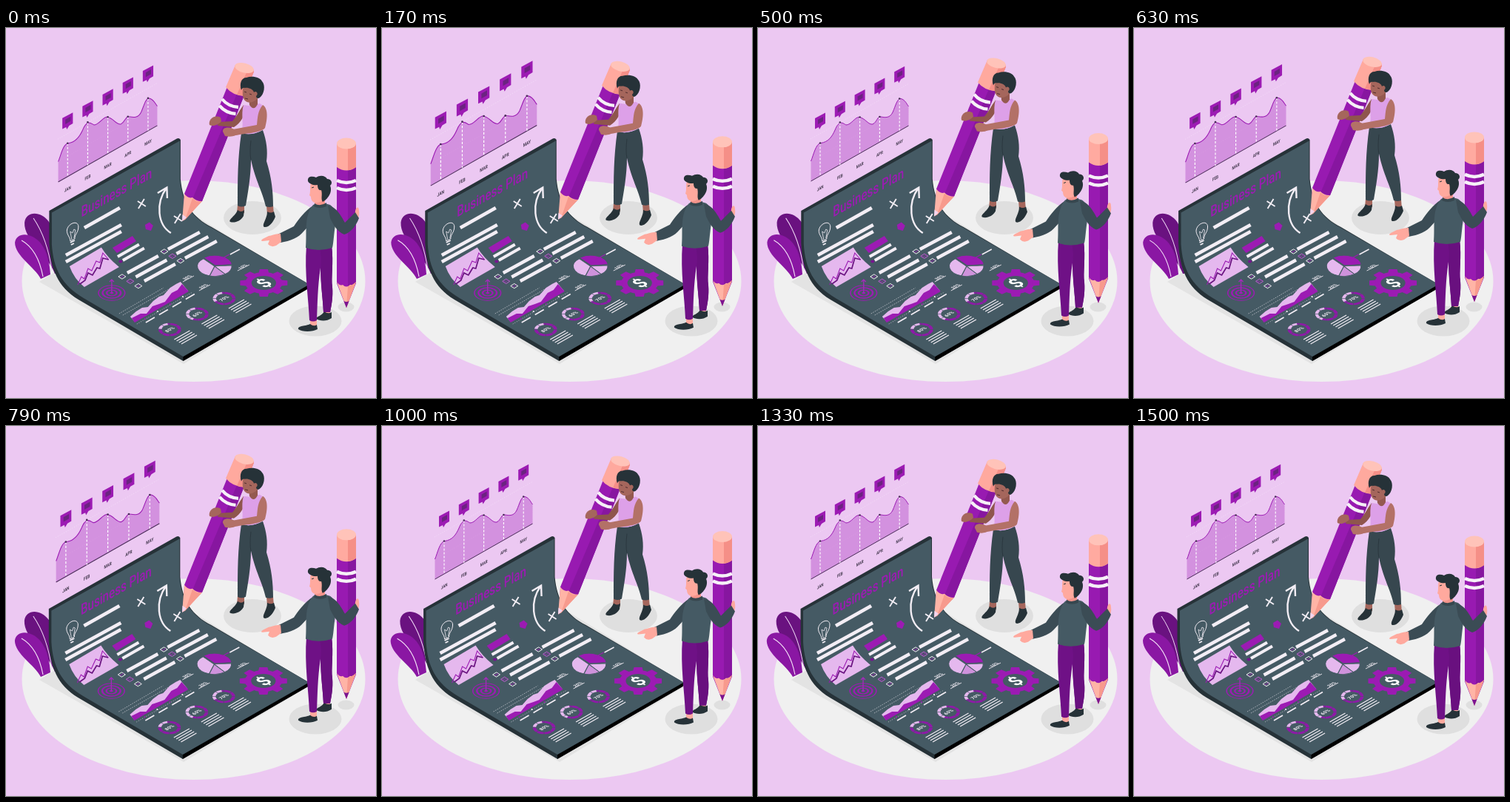
An HTML page that plays this animation: 500x500 px, repeating every 1.54 s.

```html
<!DOCTYPE html>
<html lang="en">
<head>
<meta charset="utf-8">
<title>Business Plan</title>
<style>
html, body { margin: 0; width: 100%; height: 100%; overflow: hidden; background: #ecc8f2; }
svg { display: block; width: 100vw; height: 100vh; }
text { font-family: Roboto, "Open Sans", sans-serif; text-anchor: middle; }
</style>
</head>
<body>
<svg viewBox="0 0 500 500">
  <rect width="500" height="500" fill="#ecc8f2"/>
  <ellipse cx="253.500" cy="342" rx="232" ry="136" fill="#f0f0f0"/>
  <path d="M45 343L66 330 250 250 412 350 240 454Z" fill="#e3e3e3"/>
  <g fill="#dfdfdf">
    <ellipse cx="333" cy="256.500" rx="39" ry="22.500"/>
    <ellipse cx="418" cy="396" rx="35.500" ry="20.500"/>
    <ellipse cx="459.500" cy="377" rx="11" ry="6.500"/>
  </g>

  <g id="leaves">
    <path d="M66 332C56 305 24 287 25 263C27 247 47 247 58 262C66 274 68 300 68 332Z" fill="#6a1280"/>
    <path d="M37 257C50 276 58 300 62 328" fill="none" stroke="#f0d8f5" stroke-width="1"/>
    <path d="M47 339C39 323 12 308 12 290C14 275 35 276 47 291C57 304 59 320 60 333Z" fill="#8a17a3"/>
    <path d="M21 287C37 296 46 315 50 336" fill="none" stroke="#f5e4f8" stroke-width="1.100"/>
  </g>

  <g id="paper">
    <path d="M58.500 247L231 149.500Q234 148 236 151L236 204C239 236 252 256 278 269L410 346.500V351L239.500 450 98 367C70 350 60 325 58.500 290Z" fill="#263238"/>
    <path d="M239.500 444L409 347V352L239.500 450Z" fill="#000"/>
    <path d="M62 249.500L235 152.500V204C238 236 251 256 277 269.500L410 346.500 239.500 444 105 365C75 347 64 325 62 292Z" fill="#455a64"/>
    <g id="ink"></g>
  </g>

  <g id="chart"></g>

  <g id="woman">
    <path d="M310 52L335 58 265 234 239 260 241 224Z" fill="#981ab1"/>
    <path d="M335 58L265 234 252 231 326 56Z" fill="#8716a0"/>
    <path d="M309 52C310 44 336 48 335 59L322 92Q306 91 297 80Z" fill="#ffa99e"/>
    <path d="M335 59L322 92 312 90 326 58Z" fill="#f58f87"/>
    <ellipse cx="322" cy="54" rx="13" ry="6.500" transform="rotate(14 322 54)" fill="#ffc3b9"/>
    <path d="M241 224Q246 231 252 229 258 235 265 234L242 259 238 261Z" fill="#ffb4a6"/>
    <path d="M252 230Q258 236 265 234L242 259Z" fill="#f79a8d"/>
    <path d="M238 261L238.500 252 244 256Z" fill="#f3d5ef"/>
    <path d="M292 96Q300 106 314 107M288.500 105Q297 115 310.500 116" fill="none" stroke="#f6f1f7" stroke-width="4.300"/>
    <path d="M313 239H322V250H312ZM352 240H361L362 252H353Z" fill="#a5665c"/>
    <path d="M313 246Q318 250 322 246L321 254C317 261 309 264 303 262 300 259 310 254 313 246ZM353 248Q358 251 362 248L364 255C361 263 355 270 349 269 345 266 353 258 353 248Z" fill="#263238"/>
    <path d="M318 142Q332 146 347 138C352 152 354 166 352 180 359 202 361 222 361 241Q356 243 351 241C347 222 337 206 331 178 331 200 327 222 324 240Q318 243 313 240C313 206 313 176 318 142Z" fill="#37474f"/>
    <path d="M331 152Q329 169 331 178" fill="none" stroke="#263238" stroke-width=".7"/>
    <path d="M321 104C315 112 312 119 306 126L287 127 286 132 308 134C318 128 323 117 324 108Z" fill="#8f554d"/>
    <path d="M290 121C281 116 273 124 275 131 280 134 288 130 291 126Z" fill="#a5665c"/>
    <path d="M321 104L329 105 343 102Q351 106 350 114 345 124 346 138 333 146 318 142C322 130 317 117 321 104Z" fill="#dda0e8"/>
    <path d="M328 94L340 92V103Q335 113 329 104Z" fill="#945950"/>
    <path d="M347 104C355 109 353 124 350 135 345 142 323 142 306 146L301 138 339 131C340 121 340 112 347 104Z" fill="#b37167"/>
    <path d="M310 138C302 132 292 134 293 140L296 146Q304 148 310 145Z" fill="#b37167"/>
    <path d="M321 78C319 86 319 96 324 99 330 103 338 99 342 92L341 79 330 73Z" fill="#a5665c"/>
    <path d="M318 84C315 75 318 67 325 67 333 64 344 67 346 72 351 77 349 90 343 94 341 96 338 95 338 92 342 89 338 84 335 87 334 82 326 80 323 81 320 80 319 82 318 84Z" fill="#263238"/>
    <path d="M322 86L325 87M329 89L332 90M323 95L327 96" stroke="#47252a" stroke-width=".9"/>
  </g>

  <g id="man">
    <path d="M447 157H473V345L460 378 447 345Z" fill="#981ab1"/>
    <path d="M462 160H473V345L462 349Z" fill="#8716a0"/>
    <path d="M447 156H473V188Q460 197 447 188Z" fill="#ffaaa0"/>
    <path d="M462 156H473V188Q468 192 462 192Z" fill="#f58f87"/>
    <ellipse cx="460" cy="156" rx="13" ry="7.500" fill="#ffc3b9"/>
    <path d="M447 343Q451 349 455 347 460 352 465 347 470 348 473 343L460 378Z" fill="#ffb4a6"/>
    <path d="M462 349Q468 348 473 343L460 378Z" fill="#f79a8d"/>
    <path d="M456.500 369Q460 371 463.500 369L460 378Z" fill="#7b1490"/>
    <path d="M447 206Q460 212 473 206M447 216Q460 222 473 216" fill="none" stroke="#f6f1f7" stroke-width="4.500"/>

    <path d="M430 376H438V388H430ZM411 390H420V403H411Z" fill="#ffa99e"/>
    <path d="M430 383Q435 387 440 384L440 392C433 397 424 396 419 393 419 390 427 389 430 383ZM411 400Q416 404 420 401L421 407C414 411 400 411 395 407 394 402 405 403 411 400Z" fill="#263238"/>
    <path d="M406 294H440C443 318 439 337 441 350 442 364 440 374 438 384H429C428 362 425 347 425 324 421 350 421 372 420 395Q415 398 410 395C409 367 403 331 406 294Z" fill="#6f1186"/>
    <path d="M440 294C443 318 439 337 441 350 442 364 440 374 438 384H429C428 362 424 340 426 312L424 294Z" fill="#69107f"/>
    <path d="M415 240C404 247 395 259 389 268L367 279 371 290C384 288 396 283 402 275L416 260Z" fill="#3b4c55"/>
    <path d="M371 278C362 278 359 281 355 281L347 285Q343 288 347 288L356 287 354 292Q358 297 365 294L372 289Z" fill="#ffa99e"/>
    <path d="M415 239Q426 234 438 239C445 244 447 251 446 261 443 275 443 289 441 297Q422 303 405 297C407 278 402 254 415 239Z" fill="#455a64"/>
    <path d="M472 252C471 242 477 239 477 247 478 254 476 260 470 261Z" fill="#ffa99e"/>
    <path d="M435 240C446 241 453 254 458 263L472 249 477 257C473 268 465 277 457 279 447 275 442 265 438 257Z" fill="#3b4c55"/>
    <path d="M418 228H431V239Q424 244 417 238Z" fill="#f4948b"/>
    <path d="M417 237Q424 242 433 236L433 241Q424 245 416 241Z" fill="#37474f"/>
    <path d="M412 209C410 217 412 220 410 226L412 228C412 234 416 237 421 236 428 235 433 229 434 219L427 207Z" fill="#ffa99e"/>
    <path d="M408 207C407 200 414 200 419 202 425 198 432 200 434 204 440 204 442 210 438 213 442 222 434 232 428 235 425 231 428 225 426 219 423 220 421 217 421 212 416 213 410 211 408 207Z" fill="#263238"/>
    <ellipse cx="422.500" cy="223" rx="2.600" ry="4" fill="#ffa99e"/>
    <path d="M413 216L416 215" stroke="#263238" stroke-width="1"/>
  </g>
</svg>
<script>
const $ = id => document.getElementById(id);
const WHITE = '#f3eef5', PURPLE = '#9c1bb3', PINK = '#e5b8ee', SLATE = '#455a64', PLUM = '#4a2d59';

function add(parent, tag, attrs, label) {
  const el = document.createElementNS('http://www.w3.org/2000/svg', tag);
  for (const key in attrs) el.setAttribute(key, attrs[key]);
  if (label) el.textContent = label;
  parent.appendChild(el);
  return el;
}
const shape = (g, d, fill) => add(g, 'path', { d, fill });
const stroke = (g, d, color, width, dash = 'none') =>
  add(g, 'path', { d, fill: 'none', stroke: color, 'stroke-width': width, 'stroke-dasharray': dash });
const floorAt = (g, x, y) => add(g, 'g', { transform: `matrix(.87 -.5 .87 .5 ${x} ${y})` });
const wallText = (g, x, y, size, fill, label, weight) =>
  add(g, 'text', { transform: `matrix(.75 -.42 0 1 ${x} ${y})`, 'font-size': size, 'font-weight': weight, fill }, label);
const floorText = (g, x, y, size, label) =>
  add(floorAt(g, x, y), 'text', { y: size * .36, 'font-size': size, 'font-weight': 700, fill: WHITE }, label);
const arc = (r, a, b) => {
  const at = q => `${r * Math.cos(q)} ${r * Math.sin(q)}`;
  return `${at(a)}A${r} ${r} 0 ${b - a > Math.PI ? 1 : 0} 1 ${at(b)}`;
};
// a run of parallel rules, each shifted by (dx, dy)
function rules(g, n, x, y, w, h, dx, dy, width) {
  for (let i = 0; i < n; i++) stroke(g, `M${x + i * dx} ${y + i * dy}l${w} ${-h}`, WHITE, width);
}

function drawWall(g) {
  wallText(g, 149.500, 229, 20.200, PURPLE, 'Business Plan', 500);
  stroke(g, 'M106 270L154 243', WHITE, 4.800);
  rules(g, 2, 81, 307, 75, 41, 0, 9, 4.600);
  stroke(g, 'M87 288C87 282 82 280 82.500 273C84 264 97 259 98 268C98 277 93 278 93 285Z', WHITE, 1);
  stroke(g, 'M89 286L87 275 90 277 92 272 94 273 92 284', WHITE, .8);
  stroke(g, 'M87 290L93 287M88 293L92 291', WHITE, 1.800);
  stroke(g, 'M178 234L189 241M187 231L179 244M227 254L238 261M236 251L228 264', WHITE, 1.900);
  stroke(g, 'M223 277C205 266 202 237 217 216M205 223L217.500 215.500 218 230', WHITE, 2.400);
  shape(g, 'M188 266L194 262.500 199 267 196 274 189 272Z', PURPLE);
}

function drawLists(g) {
  shape(g, 'M86 322L129 296.500Q137 310 153 323L106 350Q92 339 86 322Z', PINK);
  stroke(g, 'M97 347L102 336 106 339 111 325 116 328 122 315 127 317 131 304 138 312', PURPLE, 1.100);
  stroke(g, 'M100 346L107 341 111 331 117 334 123 324 127 325 131 311 139 313', '#6a1280', 1.700);
  shape(g, 'M144 297L171 281 176 288 150 304Z', PURPLE);
  rules(g, 2, 151, 309, 29, 16.500, 7, 5, 4);
  add(g, 'ellipse', { cx: 155, cy: 315.500, rx: 2.500, ry: 2, fill: '#771490' });
  rules(g, 3, 164, 331, 42, 23, 11.500, 5.500, 4.400);
  rules(g, 3, 219, 299, 43, 23, 11.500, 6, 4.400);
  for (let i = 0; i < 6; i++) {
    const j = i % 3, far = i > 2;
    const x = (far ? 214 : 157) + j * 11, y = (far ? 302 : 336) + j * 6.300;
    stroke(g, `M${x - 5} ${y}l5 -3.200 5 3.200 -5 3.200Z`, j % 2 ? '#c05bd2' : WHITE, 1);
    stroke(g, `M${x - 2.500} ${y}l2 1 3 -3`, PURPLE, 1);
  }
}

function drawTarget(g) {
  const disc = floorAt(g, 143, 358);
  for (const r of [14.500, 10, 5.500]) add(disc, 'circle', { r, fill: 'none', stroke: PURPLE, 'stroke-width': r > 12 ? 1.300 : 2 });
  add(disc, 'circle', { r: 2, fill: PURPLE });
  stroke(g, 'M143 358V341M140 343L143 340 146 343', '#a52abb', 1.300);
}

function drawArea(g) {
  stroke(g, 'M153 386L213 351M158 388L222 352', WHITE, .6, '1.500 1.500');
  shape(g, 'M168 390L176 383 184 378 192 377 199 369 207 363 213 361 222 351 230 346 236 343 246 355 174 397Z', PINK);
  shape(g, 'M170 392L182 386 190 386 198 376 207 373 215 370 224 358 232 354 238 346 247 356 174 398Z', PURPLE);
  stroke(g, 'M177 400L252 357', WHITE, .7, '1 2');
  for (let i = 0; i < 4; i++) {
    stroke(g, `M${189 + i * 18} ${398 - i * 10.500}l12 -7`, WHITE, 1.700);
    add(g, 'circle', { cx: 188 + i * 17, cy: 393 - i * 10, r: 1.100, fill: i % 2 ? WHITE : PURPLE });
  }
}

function drawDonut(g, x, y, share) {
  const d = floorAt(g, x, y), r = 10.700, turn = 2 * Math.PI;
  stroke(d, 'M' + arc(r, -1, -1 + turn * share), '#8f19a8', 3.600);
  stroke(d, 'M' + arc(r, -1 + turn * share, -1 + turn), PINK, 3.600);
  for (let i = 0; i < 8; i++) {
    const a = i * turn / 8, c = Math.cos(a), s = Math.sin(a);
    stroke(d, `M${8 * c} ${8 * s}L${13 * c} ${13 * s}`, SLATE, .6);
  }
  floorText(g, x, y, 6.400, share * 100 + '%');
  rules(g, 4, x + 6, y + 13.500, 21, 12, 3.200, 2, 1.200);
}

function drawPie(g) {
  const d = floorAt(g, 282, 322), fills = [PINK, '#cf92dc', PINK, PURPLE];
  const cuts = [.7, 1.700, 2.650, 4.800, 6.980];
  fills.forEach((fill, i) => {
    const lift = i === 3 ? 'translate(1.500 -1)' : 'none';
    add(d, 'path', { d: `M0 0L${arc(19, cuts[i], cuts[i + 1])}Z`, fill, stroke: SLATE, 'stroke-width': 1, transform: lift });
  });
  stroke(g, 'M289 313L302 306', PURPLE, 1.200);
  stroke(g, 'M303 306L316 299', WHITE, 1.500);
  stroke(g, 'M239 343L254 335M261 355L276 347M313 328L329 320', WHITE, .9);
  [['30%', 245, 337], ['20%', 267, 349], ['10%', 320, 322.500]].forEach(([s, x, y]) => floorText(g, x, y, 6, s));
}

function drawGear(g) {
  const d = floorAt(g, 348.500, 344.500);
  add(d, 'circle', { r: 20.500, fill: PURPLE });
  for (let i = 0; i < 8; i++)
    add(d, 'path', { d: 'M-5.500 -19L-4.500 -26H4.500L5.500 -19Z', fill: PURPLE, transform: `rotate(${i * 45})` });
  add(d, 'circle', { r: 13.500, fill: SLATE });
  add(d, 'text', { y: 8.300, 'font-size': 23, 'font-weight': 700, fill: '#fff' }, '$');
}

function drawChart(g) {
  const base = x => 207 - (x - 71.500) * .568;
  const top = 'M71.500 180C75 172 78 156 85 155.500C95 154 100 147 104 138C110 123 115 129 119 131C126 131 131 120 137 120.500C145 122 149 131 155 130C161 127 161 119 166 120C172 121 178 122 182 114C186 105 188 95 193 95.500C199 97 201 103 203.500 106';
  for (const y of [150, 180]) stroke(g, `M71 ${y}L204 ${y - 75}`, '#fff', .6, '1 2').setAttribute('opacity', .6);
  add(g, 'path', { d: `${top}V132L71.500 207Z`, fill: '#c169d2', opacity: .57 });
  stroke(g, top, PURPLE, 1);
  stroke(g, 'M71.500 207L203.500 132', PLUM, 1);
  const peaks = [155.500, 127.500, 120.500, 120, 95.500];
  ['JAN', 'FEB', 'MAR', 'APR', 'MAY'].forEach((month, i) => {
    const x = 84 + i * 26.800, y = 125 - i * 15.700;
    stroke(g, `M${x} ${peaks[i]}V${base(x)}`, '#fff', 1.100, '3 2');
    add(g, 'circle', { cx: x, cy: peaks[i], r: 1.300, fill: PLUM });
    shape(g, `M${x - 7} ${y - 3}L${x + 7} ${y - 10.500}V${y + 4}L${x + 2} ${y + 7} ${x - 1} ${y + 12} ${x - 2} ${y + 9}L${x - 7} ${y + 11.500}Z`, PURPLE);
    shape(g, `M${x - 3} ${y - 1}l7 -4v6l-7 4Z`, '#6b2380');
    wallText(g, x, y + 93.500 + i * .2, 6, '#453a50', month, 600);
  });
}

const ink = $('ink');
drawWall(ink);
drawLists(ink);
drawTarget(ink);
drawArea(ink);
drawDonut(ink, 221.500, 407.500, .8);
drawDonut(ink, 258.500, 386.500, .6);
drawDonut(ink, 295, 365.500, .7);
drawPie(ink);
drawGear(ink);
drawChart($('chart'));

// linear interpolation through [position, value] stops
function track(stops, p) {
  let i = 1;
  while (i < stops.length - 1 && p > stops[i][0]) i++;
  const [a, u] = stops[i - 1], [b, v] = stops[i];
  return u + (v - u) * (p - a) / (b - a);
}
const SHAKE = [0, -1, 2, -4, 4, -4, 4, -4, 2, -1, 0].map((x, i) => [i / 10, x]);
const BEAT = [[0, 1], [.1, 1.1], [.3, 1], [.4, 1], [.5, 1.1], [.6, 1], [1, 1]];
const FLOAT = [[0, 0], [.5, -9.700], [1, 0]];
const WIND = [[0, 0], [.25, .7], [.75, -.7], [1, 0]];
const LOOP = 1540, STEP = 1000 / 24;

function render(ms) {
  const step = Math.floor((ms % LOOP + 5) / STEP);
  const p = Math.min(1, (step + .5) / 36);
  const rise = `translate(0 ${track(FLOAT, step / 36)})`;
  $('woman').setAttribute('transform', rise);
  $('man').setAttribute('transform', rise);
  $('paper').setAttribute('transform', `translate(${track(SHAKE, p)} 0)`);
  $('chart').setAttribute('transform', `translate(137.500 137) scale(${track(BEAT, p)}) translate(-137.500 -137)`);
  $('leaves').setAttribute('transform', `rotate(${track(WIND, p)} 52 337)`);
}

const start = performance.now();
function tick() {
  render(performance.now() - start);
  requestAnimationFrame(tick);
}
tick();
</script>
</body>
</html>
```
